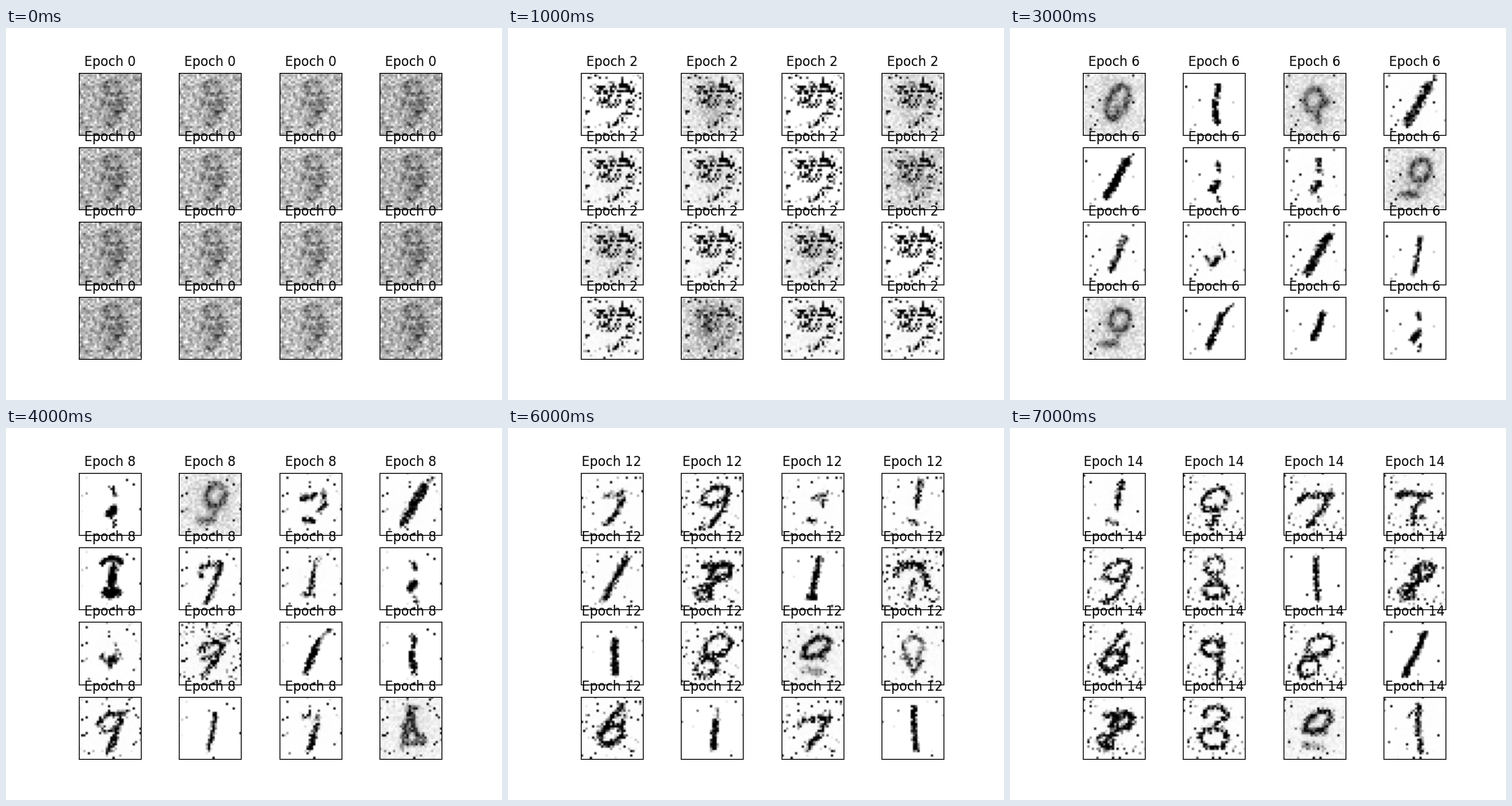
These frames come from a looping animation (640 px wide and 480 px high, 8 s). A matplotlib script:

```python
import numpy as np
import matplotlib.pyplot as plt
from matplotlib.animation import FuncAnimation

N = 28
Y, X = np.mgrid[0:N, 0:N].astype(float)
BORDER = np.clip(np.hypot(X - 13.5, Y - 13.5) / 13, 0, 1) ** 1.5
CENTRE = np.exp(-(X - 14) ** 2 / 50 - (Y - 13) ** 2 / 90)

# look of a tile: gain, roughness, haze, share of stray dots
CRISP = (2.2, 0.6, 0, 0.012)
PLAIN = (1.7, 0.75, 0.02, 0.035)
DOTTED = (1.8, 0.85, 0.03, 0.08)
NOISY = (1.8, 1.0, 0.06, 0.16)
FAINT = (1.0, 0.9, 0.05, 0.03)
HAZY = (0.9, 0.85, 0.4, 0.04)


def line(*p, w=1.2, k=1.0):
    """Stroke through points; w is half its width, k its strength."""
    return np.reshape(p, (-1, 2)).astype(float), w, k


def ring(cx, cy, rx, ry, tilt=0, a=0, b=360, w=1.0, k=1.0):
    """Arc of an ellipse from angle a to b, clockwise on screen."""
    t = np.radians(np.linspace(a, b, 17))
    s = np.radians(tilt)
    u, v = rx * np.cos(t), ry * np.sin(t)
    x = cx + u * np.cos(s) - v * np.sin(s)
    y = cy + u * np.sin(s) + v * np.cos(s)
    return np.column_stack([x, y]), w, k


def tile(look, *strokes):
    return look, strokes


def distance(points):
    best = np.full((N, N), 99.0)
    for (x0, y0), (x1, y1) in zip(points[:-1], points[1:]):
        dx, dy = x1 - x0, y1 - y0
        t = ((X - x0) * dx + (Y - y0) * dy) / (dx * dx + dy * dy + 1e-9)
        t = np.clip(t, 0, 1)
        best = np.minimum(best, np.hypot(X - x0 - t * dx, Y - y0 - t * dy))
    return best


def ink(strokes, wobble=0, soft=1.5):
    out = np.zeros((N, N))
    for points, w, k in strokes:
        d = distance(points) + wobble
        out = np.maximum(out, k * np.clip((w + soft / 2 - d) / soft, 0, 1))
    return out


def render(tiles, seed, shared=0.4):
    """Draw tiles that share part of their grain and all their dot places."""
    rng = np.random.default_rng(seed)
    grain = rng.random((N, N))
    field = rng.random((N, N))
    images = []
    for (gain, rough, haze, dots), strokes in tiles:
        own = rng.random((N, N))
        tex = shared * grain + (1 - shared) * own
        shape = ink(strokes, 1.8 * rough * (tex - 0.5), 1.5 + 3 * haze)
        img = np.clip(gain * (shape - rough * tex * (0.4 + 0.6 * shape)), 0, 1)
        img += haze * (0.45 * own + 0.5 * CENTRE * (0.3 + own))
        speck = np.clip(1 - field / (dots * BORDER + 1e-9), 0, 1)
        images.append(np.clip(np.maximum(img, 1.5 * speck ** 1.5), 0, 1))
    return images


def untrained():
    rng = np.random.default_rng(3)
    grain = rng.normal(0, 0.13, (N, N))
    body = ink([ring(14, 6.5, 3.5, 2.5, w=1), line(18, 9, 18, 16, 13, 23, w=2),
                line(11, 13, 15, 15, w=2, k=0.8)], soft=3)
    body *= rng.uniform(0.1, 1, (N, N))
    base = [0.28, 0.25, 0.24, 0.28] * 4
    return [np.clip(b + grain + 0.38 * body + 0.05 * CENTRE
                    + rng.normal(0, 0.02, (N, N)), 0, 1) for b in base]


def scattered():
    strokes = [line(9, 8, 20, 7, w=2.4), line(9, 12.5, 15, 13, w=1.8, k=0.85),
               line(22, 12, 20, 18, 16, 22, w=1.2, k=0.85),
               line(12, 23, 17, 23, w=0.7, k=0.9)]
    haze = [0, 0.4, 0, 0.35, 0.1, 0.2, 0, 0.5, 0.3, 0.1, 0.3, 0, 0.08, 0.65, 0.1, 0.05]
    return [tile((2.1 - 2 * h, 1.15, h, 0.15), *strokes) for h in haze]


def merging():
    top = line(16, 7, 14, 12, w=1.9, k=0.85)
    low = line(15, 14, 13, 20, w=2.2)
    soft = [line(16, 5, 12, 11, w=1.6, k=0.8), line(16, 9, 18, 12, w=1.5, k=0.7),
            line(16, 16, 13, 21, w=2, k=0.85), line(13, 14, 12, 20, w=1.2, k=0.8)]
    halo = ring(14.5, 13.5, 5.5, 8.5, 15, w=1.6)
    blob = tile((1.4, 0.65, 0.08, 0.06), top, low)
    grey = tile((1.0, 0.7, 0.3, 0.06), top, low)
    loose = tile((1.2, 0.8, 0.12, 0.07), *soft)
    hollow = tile((2.2, 1.05, 0.02, 0.05), halo, line(14, 21, 16, 16, w=1))
    dark = tile((2.4, 0.7, 0, 0.04), top, low)
    return [blob, grey, blob, hollow, loose, loose, loose, blob,
            blob, blob, blob, loose, blob, hollow, dark, grey]


def slashes():
    knot = line(15, 16, 13, 18.5, w=1.6)
    tip = line(15, 7, 15.5, 10, w=0.8, k=0.85)
    tail = line(15, 22, 16, 24, w=0.4)
    eight = [ring(16, 10, 4, 5, 20, w=1.4), line(9, 21, 14, 21, w=1.8),
             line(18, 14, 15, 18, w=1.2, k=0.8)]
    thick = line(19.5, 6, 10, 22, w=1.9)
    upper = [
        tile(HAZY, ring(15, 13, 4, 8, 22, w=1.5), line(15, 16, 13, 21, w=1.5)),
        tile(CRISP, line(15, 6, 15, 10, w=1), line(14, 13, 14, 16, 15, 22, w=1.1)),
        tile(HAZY, ring(13, 12, 4, 5, 15, w=1.3), line(19, 12, 15, 16, 15, 22, w=1.4)),
        tile(PLAIN, thick, line(20, 5, 23, 2, w=0.4, k=0.8)),
        tile(CRISP, line(19, 6, 10, 22, w=1.5), line(20, 5, 22, 3, w=0.3)),
        tile(CRISP, knot, tip, tail),
        tile(PLAIN, knot, line(15, 6, 16, 11, w=1.2, k=0.85), tail),
        tile(HAZY, *eight)]
    lower = [
        tile(PLAIN, line(18, 7, 16, 11, w=1.4, k=0.7), line(16, 12, 12, 21, w=1.2)),
        tile(PLAIN, knot, line(10, 15, 11, 17, w=0.9, k=0.8),
             line(16, 10, 18, 15, w=0.7, k=0.7)),
        tile(PLAIN, thick),
        tile(CRISP, line(16, 7, 15, 13, 13, 23, w=0.8)),
        tile(HAZY, *eight),
        tile(CRISP, line(17, 8, 11, 22, w=1.2), line(18, 7, 22, 3, w=0.3)),
        tile(CRISP, line(17, 8, 13, 18, w=1.4)),
        tile(CRISP, knot, tip, line(16, 21, 15, 24, w=0.4))]
    return upper + lower


def forming():
    upper = [
        tile((1.1, 0.8, 0.2, 0.1), line(13, 5, 16, 5, w=1.3), line(13, 7, 10, 21, w=1.6),
             line(14, 8, 15, 15, 19, 19, w=1.6), line(10, 21, 19, 20, w=1.4)),
        tile(CRISP, line(16.5, 5, 13, 21, w=1.1), line(11, 22, 14, 22, w=1)),
        tile(PLAIN, line(10, 13, 9, 9, 18, 7, w=0.9), line(18, 8, 16, 15, 12, 24, w=1.2)),
        tile(PLAIN, line(20, 5, 14, 15, 10, 23, w=1.4)),
        tile(PLAIN, line(17, 5, 15, 9, w=1, k=0.6), line(15, 10, 13, 20, w=1.2),
             line(11, 21, 14, 21, w=1.1)),
        tile(FAINT, ring(14, 11, 4.5, 5, a=100, b=340, w=1),
             line(10, 15, 14, 22, 17, 17, w=1.3), line(18, 11, 15, 17, w=1.1)),
        tile(PLAIN, line(10, 11, 15, 10, w=1.3), line(19, 8, 20, 14, 17, 17, w=0.9, k=0.8),
             line(11, 21, 14, 21, w=1.4)),
        tile(PLAIN, line(11, 10, 18, 9, w=1.1, k=0.85), line(18, 12, 15, 18, 11, 23, w=1.2))]
    lower = [
        tile(NOISY, line(10, 11, 20, 7, w=1.3), line(19, 10, 15, 18, 11, 23, w=1.4),
             line(10, 16, 16, 15, w=1)),
        tile(CRISP, line(14.5, 8, 14.5, 22, w=1.3)),
        tile(DOTTED, line(8, 12, 12, 8, 20, 7, w=1.2), line(18, 9, 16, 16, 13, 24, w=1.4),
             line(10, 15, 16, 15, w=0.9, k=0.85)),
        tile(CRISP, line(16, 6, 15, 10, w=0.8, k=0.5), line(15, 11, 14, 22, w=1.2)),
        tile(PLAIN, line(10, 9, 13, 8, w=1.2, k=0.7), line(17, 6, 16, 10, w=0.7, k=0.6),
             line(16, 12, 13, 23, w=1.2)),
        tile(PLAIN, line(14, 11, 19, 9, 18, 14, w=0.9, k=0.85),
             line(11, 21, 14, 21, w=0.9)),
        tile(CRISP, ring(14, 7, 4, 2.5, a=180, b=360, w=1), line(15, 9, 14, 16, w=1.8),
             line(12, 20, 16, 20, w=2.4)),
        tile(NOISY, line(6, 11, 9, 8, 18, 8, 20, 17, w=1.6),
             line(14, 15, 12, 22, w=1.3, k=0.8))]
    return upper + lower


def digits():
    knotted = [ring(17, 11, 5, 3, -30, w=1.5), line(16, 13, 10, 20, w=1.5),
               ring(10, 20, 3, 3, w=1.1)]
    upper = [
        tile(PLAIN, line(17, 4, 16, 9, 15, 15, w=1.1), line(11, 21, 15, 22, w=1, k=0.65)),
        tile(DOTTED, ring(14, 12, 6.5, 4, -35, w=1), line(9, 16, 18, 15, w=1),
             line(16, 16, 12, 24, w=1.2)),
        tile(DOTTED, line(7, 12, 9, 10, 21, 9, w=1.1), line(20, 10, 16, 17, 11, 23, w=1.3)),
        tile(DOTTED, line(6, 10, 12, 9, 20, 10, w=1.2), line(18, 10, 13, 16, 13, 23, w=1.1),
             line(12, 20, 17, 20, w=0.7)),
        tile(DOTTED, ring(15, 10, 6, 3.5, -30, w=1), line(20, 9, 18, 17, 13, 23, 9, 24, w=1.1),
             line(9, 14, 16, 15, w=0.9)),
        tile(DOTTED, ring(14, 8, 4, 4, w=0.9, k=0.75), line(10, 10, 17, 17, w=1.2),
             ring(14, 19, 5, 3, w=1.2)),
        tile(CRISP, line(14, 5, 14, 14, 15, 23, w=1)),
        tile(DOTTED, *knotted)]
    lower = [
        tile(DOTTED, line(18, 4, 11, 12, 8, 18, w=1.2), ring(13, 17, 5.5, 3.5, -30, w=1.4),
             line(19, 9, 16, 18, w=1)),
        tile(DOTTED, ring(12.5, 11, 4.5, 3.5, w=1.1), line(17, 8, 16, 17, 15, 25, w=1.3)),
        tile(DOTTED, ring(16, 10, 6, 4, -25, w=0.9), line(9, 15, 19, 14, w=1.2),
             ring(11, 20, 5, 3.5, -25, w=1)),
        tile(CRISP, line(18, 5, 14, 14, 9, 23, w=1.3)),
        tile(DOTTED, line(10, 8, 21, 8, w=1.5), *knotted),
        tile(DOTTED, ring(14, 8, 5, 3.5, a=180, b=380, w=1.1), line(18, 9, 11, 15, w=1),
             ring(13.5, 18, 6, 4.5, w=1.1)),
        tile((1.3, 0.7, 0.15, 0.05), ring(15, 11, 6.5, 3.5, -35, w=1.3),
             line(9, 15, 18, 15, w=1.3), line(9, 21, 16, 22, w=2, k=0.45)),
        tile(PLAIN, line(15, 4, 15, 13, 16, 24, w=1.1), line(11, 8, 13, 6, w=0.7, k=0.8))]
    return upper + lower


def mix(early, late, seed):
    pool = early[1::2] + late[::2]
    order = np.random.default_rng(seed).permutation(len(pool))
    return [pool[i] for i in order]


EPOCHS = {
    0: untrained(),
    2: render(scattered(), 12, 0.9),
    4: render(merging(), 14, 0.8),
    6: render(slashes(), 16),
    8: render(mix(slashes(), forming(), 5), 18),
    10: render(forming(), 20),
    12: render(mix(forming(), digits(), 7), 22),
    14: render(digits(), 24),
}

fig, axes = plt.subplots(4, 4, figsize=(6.4, 4.8), dpi=100)
pictures, titles = [], []
for ax in axes.flat:
    pictures.append(ax.imshow(np.zeros((N, N)), cmap="gray_r", vmin=0, vmax=1))
    titles.append(ax.set_title(""))
    ax.set_xticks([])
    ax.set_yticks([])


def update(i):
    epoch = 2 * i
    for picture, title, img in zip(pictures, titles, EPOCHS[epoch]):
        picture.set_data(img)
        title.set_text(f"Epoch {epoch}")
    return pictures + titles


anim = FuncAnimation(fig, update, frames=len(EPOCHS), interval=1000, repeat=True)
plt.show()
```
